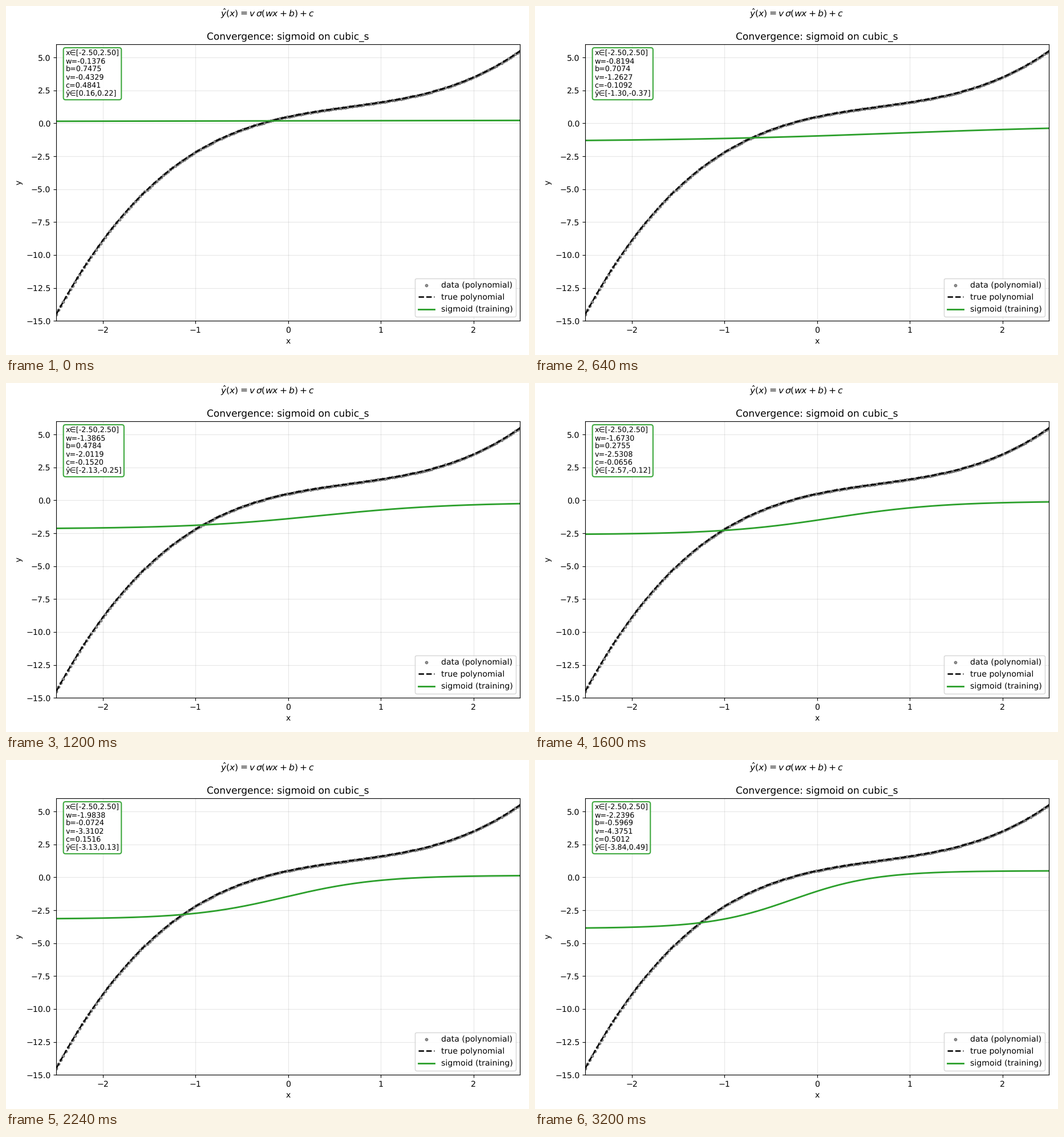
These frames come from a looping animation (917 by 611 pixels, 3.28 s). A matplotlib script:

```python
import matplotlib.pyplot as plt
import numpy as np
from matplotlib.animation import FuncAnimation

W, H, DPI = 917, 611, 917 / 9
FRAMES, INTERVAL = 41, 80
GREEN = "#2ca02c"
START = (-0.1376, 0.7475, -0.4329, 0.4841)  # w, b, v, c
RATE, SUBSTEPS = 0.1, 25  # descent per frame, split into small steps

plt.rcParams.update({"font.family": "DejaVu Sans", "text.hinting": "none"})


def cubic(x):
    return 0.4 * x**3 - 0.8 * x**2 + 1.5 * x + 0.5


def sigmoid(z):
    return 1 / (1 + np.exp(-z))


def model(p, x):
    w, b, v, c = p
    return v * sigmoid(w * x + b) + c


def gradient(p, x, y):
    w, b, v, c = p
    s = sigmoid(w * x + b)
    err = v * s + c - y
    slope = err * v * s * (1 - s)
    return np.array([(slope * x).mean(), slope.mean(), (err * s).mean(), err.mean()])


def train(x, y):
    p = np.array(START)
    history = []
    for _ in range(FRAMES):
        history.append(p)
        for _ in range(SUBSTEPS):
            p = p - RATE / SUBSTEPS * gradient(p, x, y)
    return history


def summary(p, yhat):
    w, b, v, c = p
    return (f"x∈[{xs[0]:.2f},{xs[-1]:.2f}]\nw={w:.4f}\nb={b:.4f}\nv={v:.4f}\n"
            f"c={c:.4f}\nŷ∈[{yhat.min():.2f},{yhat.max():.2f}]")


xs = np.linspace(-2.5, 2.5, 200)
ys = cubic(xs)
history = train(xs, ys)

fig = plt.figure(figsize=((W + 0.001) / DPI, (H + 0.001) / DPI), dpi=DPI)
left, right, top, bottom = 88.2, 901.2, 67.2, 551.2
ax = fig.add_axes([left / W, 1 - bottom / H, (right - left) / W, (bottom - top) / H])
ax.set(xlim=(-2.5, 2.5), ylim=(-15, 6), xlabel="x", ylabel="y",
       xticks=range(-2, 3), yticks=np.arange(-15, 6, 2.5))
ax.set_title("Convergence: sigmoid on cubic_s")
ax.grid(alpha=0.3)
fig.text(0.5, 1 - 17.6 / H, r"$\hat{y}(x) = v\,\sigma(wx + b) + c$",
         size=11, ha="center", va="baseline")

ax.scatter(xs, ys, s=10, color="black", alpha=0.4, label="data (polynomial)")
ax.plot(xs, ys, "k--", lw=1.8, label="true polynomial")
fit, = ax.plot(xs, model(history[0], xs), color=GREEN, lw=2, label="sigmoid (training)")
ax.legend(loc="lower right", labelspacing=0.55)
info = ax.text(0.02, 0.98, "", transform=ax.transAxes, size=9, va="top", linespacing=1.15,
               bbox=dict(boxstyle="round,pad=0.3", fc="white", ec=GREEN, lw=1.5, alpha=0.9))


def update(i):
    p = history[i]
    yhat = model(p, xs)
    fit.set_ydata(yhat)
    info.set_text(summary(p, yhat))
    return fit, info


anim = FuncAnimation(fig, update, frames=FRAMES, interval=INTERVAL,
                     repeat=True, repeat_delay=0, blit=False)
plt.show()
```
